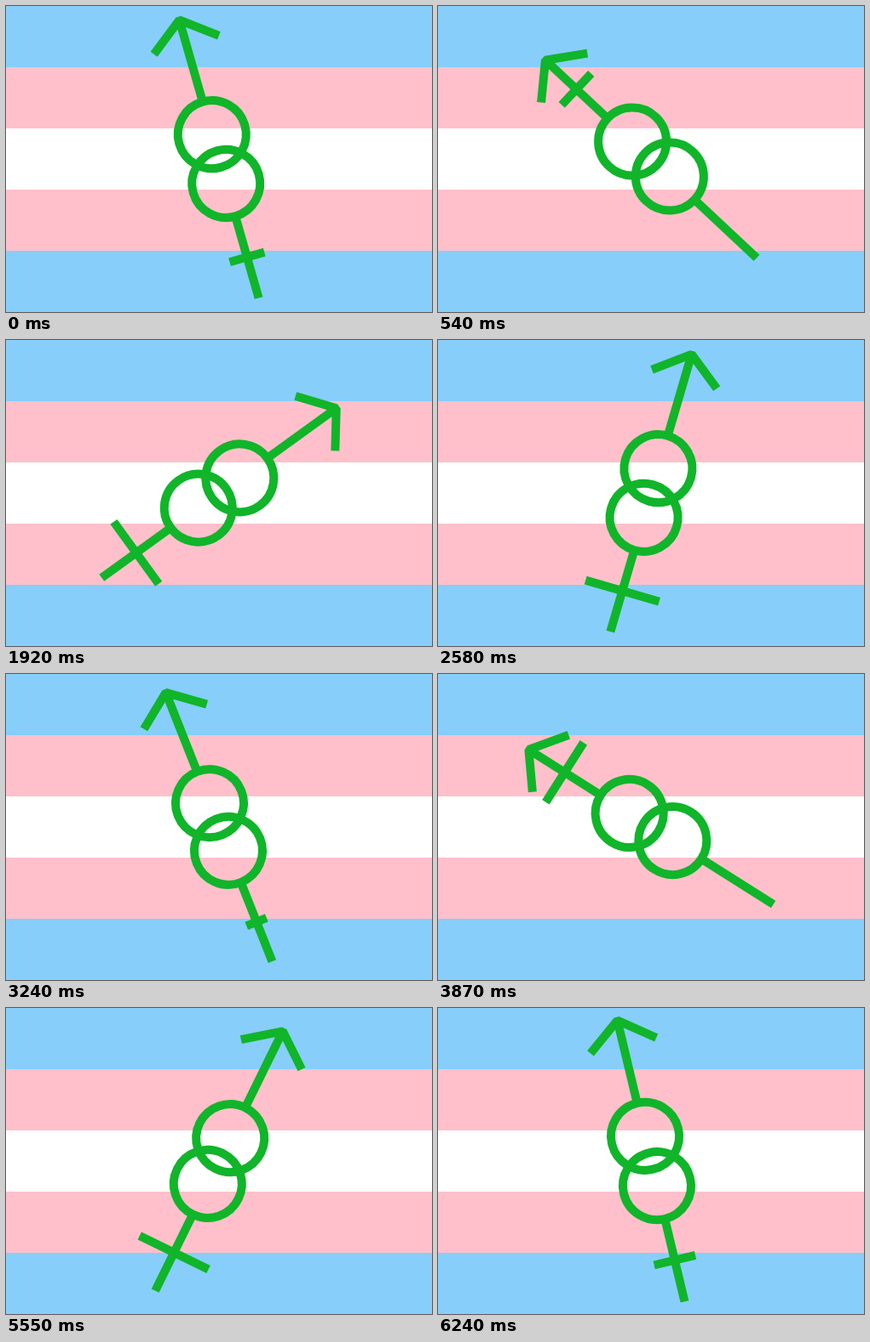
Recreate the animation shown at these times as an HTML page. Size 500 by 360 pixels, loop 6.27 s.

```html
<!DOCTYPE html>
<html lang="en">
<head>
<meta charset="utf-8">
<title>Turning symbol</title>
<style>
html, body { margin: 0; height: 100%; overflow: hidden; }
svg { display: block; width: 500px; height: 360px; }
</style>
</head>
<body>
<svg viewBox="0 0 500 360">
  <rect width="500" height="360" fill="#87cefa"/>
  <rect y="72" width="500" height="216" fill="#ffc0cb"/>
  <rect y="144" width="500" height="72" fill="#fff"/>
  <g id="symbol" fill="none" stroke="#10b529" stroke-width="10" stroke-linejoin="bevel">
    <circle cy="-30" r="40"/>
    <circle cy="30" r="40"/>
    <path d="M0-70V-170M0 70V170"/>
    <path id="bar"/>
    <path id="head"/>
  </g>
</svg>
<script>
const LOOP = 6270, STEP = 30, START = 15.9, DEG = 180 / Math.PI;
const [symbol, bar, head] = ['symbol', 'bar', 'head'].map(id => document.getElementById(id));

// A part folds shut over 30 degrees, changes ends, and opens over the next 30.
function fold(turn, shutAt) {
  const x = (turn - shutAt + 720) % 360;
  const gap = Math.min(x % 180, 180 - x % 180);
  return { side: x < 180 ? 1 : -1, open: Math.min(1, gap / 30) };
}

function draw(ms) {
  const turn = START + ms / 1000 * DEG;
  symbol.setAttribute('transform', `translate(250 180) rotate(${-turn})`);

  const cross = fold(turn, 30), half = 45 * cross.open;
  bar.setAttribute('d', `M${-half} ${-120 * cross.side}H${half}`);

  const arrow = fold(turn, 90), angle = 52.5 * arrow.open / DEG;
  const x = 50 * Math.sin(angle), y = arrow.side * (170 - 50 * Math.cos(angle));
  head.setAttribute('d', `M${-x} ${y}L0 ${170 * arrow.side}L${x} ${y}`);
}

const begin = performance.now();
function tick() {
  const ms = (performance.now() - begin) % LOOP;
  draw(Math.floor(ms / STEP) * STEP);
  requestAnimationFrame(tick);
}
tick();
</script>
</body>
</html>
```
